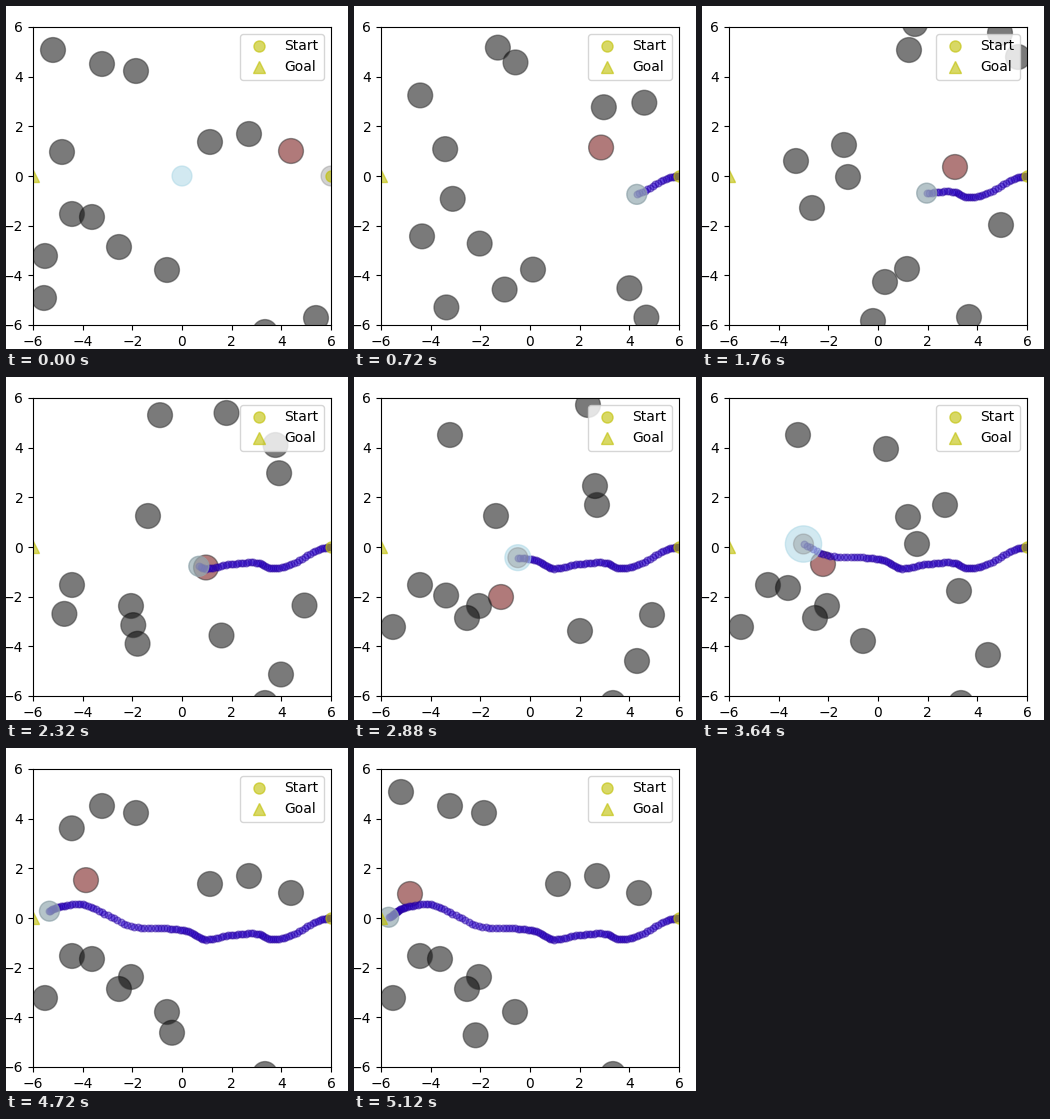
These frames come from a looping animation (342 px wide and 343 px high, 5560 ms). A matplotlib script:

```python
import numpy as np
import matplotlib.pyplot as plt
from matplotlib.animation import FuncAnimation
from matplotlib.patches import Circle

W, H, DPI = 342, 343, 100
SIDE = 298                      # axes size in pixels
LEFT, TOP = 27, 21
UNIT = SIDE / 12                # pixels per world unit
STEP_MS, LAST, TOTAL = 40, 128, 139
ROBOT_R, OBSTACLE_R = 0.4, 0.5
SPEED = 4.45                    # obstacle cruising speed, pixels per step
BEATS = (44, 72, 91)            # steps at which obstacles turn

# Resting places in stage pixels (x + yj): each walker moves on to the next one
CHAIN = [310+312j, 38+292j, 86+211j, 113+241j, 259+326j, 285+145j, 130+65j,
         56+146j, 204+136j, 243+128j, 47+44j, 66+208j, 125+229j]
# Walkers that come back to where they started
LOOPERS = [96+58j, 39+250j, 161+264j]

# Turning points on the way, one per beat; after the last the walker heads home
TURNS = [
    (267+311j, 283+284j, 286+278j),
    (171+315j,),
    (183+276j,),
    (205+345j,),
    (299+219j, 298+238j, 257+214j),
    (298+27j, 241+109j, 206+140j),
    (207+44j, 234+28j, 184+72j),
    (142+139j, 142+139j, 215+167j),
    (316+51j,),
    (253+161j, 147+220j, 121+187j),
    (94+155j,),
    (146+171j,),
    (213+18j,),
    (110+202j,),
    (205+263j, 226+254j),
]

# Robot key points: step -> world position
ROUTE = {0: 6, 6: 5.55-.07j, 18: 4.3-.74j, 25: 3.65-.86j, 33: 3.05-.64j,
         44: 1.96-.69j, 55: .9-.86j, 64: .25-.54j, 72: -.49-.43j,
         85: -2.2-.28j, 91: -3+.12j, 101: -4.1+.57j, 107: -4.72+.5j,
         128: -5.69+.03j}

steps = np.arange(LAST + 1)


def to_world(z):
    return np.conj(z - complex(LEFT, TOP)) / UNIT + complex(-6, 6)


def walk(start, turns, goal):
    """Turn on the beats, then cruise straight to the goal and stay."""
    times = [0, *BEATS[:len(turns)]]
    arrival = times[-1] + abs(goal - turns[-1]) / SPEED
    path = np.interp(steps, [*times, arrival],
                     np.array([start, *turns, goal]))
    return to_world(path)


def spline(t, knots, values):
    """Smooth curve through the key points."""
    tan = np.gradient(values, knots)
    k = np.clip(np.searchsorted(knots, t, side="right") - 1, 0, len(knots) - 2)
    gap = knots[k + 1] - knots[k]
    u = (t - knots[k]) / gap
    ease = u * u * (3 - 2 * u)
    return (values[k] + (values[k + 1] - values[k]) * ease
            + gap * u * (1 - u) * ((1 - u) * tan[k] - u * tan[k + 1]))


robot_path = spline(steps, np.array(list(ROUTE), float),
                    np.array(list(ROUTE.values()), complex))
walker_paths = np.array([
    walk(*leg) for leg in zip(CHAIN[:-1] + LOOPERS, TURNS,
                              CHAIN[1:] + LOOPERS)])
halo_radius = np.interp(steps, [62, 72, 91, 101], [ROBOT_R, .52, .73, ROBOT_R])

fig = plt.figure(figsize=(W / DPI, H / DPI), dpi=DPI)
ax = fig.add_axes([LEFT / W, (H - TOP - SIDE) / H, SIDE / W, SIDE / H])
ax.set(xlim=(-6, 6), ylim=(-6, 6),
       xticks=range(-6, 7, 2), yticks=range(-6, 7, 2))


def disc(radius, face, edge, alpha, z):
    return ax.add_patch(Circle((0, 0), radius, fc=face, ec=edge, lw=1,
                               alpha=alpha, zorder=z))


def move(patch, z):
    patch.center = z.real, z.imag


obstacles = [disc(OBSTACLE_R, "black", "0.2", .52, 1) for _ in walker_paths]
trail, = ax.plot([], [], "o", ms=4.8, mfc=(.15, 0, .8), mec=(.15, 0, .6),
                 alpha=.45, zorder=1.2)
halo = disc(ROBOT_R, "lightblue", "lightblue", .55, 1.4)
robot = disc(ROBOT_R, "gray", "gray", .35, 1.6)
ax.plot(6, 0, "yo", ms=8, alpha=.6, label="Start")
ax.plot(-6, 0, "y^", ms=8, alpha=.6, label="Goal")
ax.legend(loc="upper right")


def update(n):
    i = min(n, LAST)
    here, spots = robot_path[i], walker_paths[:, i]
    nearest = np.argmin(abs(spots - here))
    for k, (patch, spot) in enumerate(zip(obstacles, spots)):
        move(patch, spot)
        patch.set_facecolor("#680000" if k == nearest else "black")
    move(robot, here)
    # The halo waits at the origin until the run begins
    move(halo, here if i else 0j)
    halo.set_radius(halo_radius[i])
    shown = robot_path[:i + 1] if i else robot_path[:0]
    trail.set_data(shown.real, shown.imag)
    return [*obstacles, trail, halo, robot]


anim = FuncAnimation(fig, update, frames=TOTAL, interval=STEP_MS,
                     init_func=lambda: update(0), repeat=True, repeat_delay=0)
plt.show()
```
